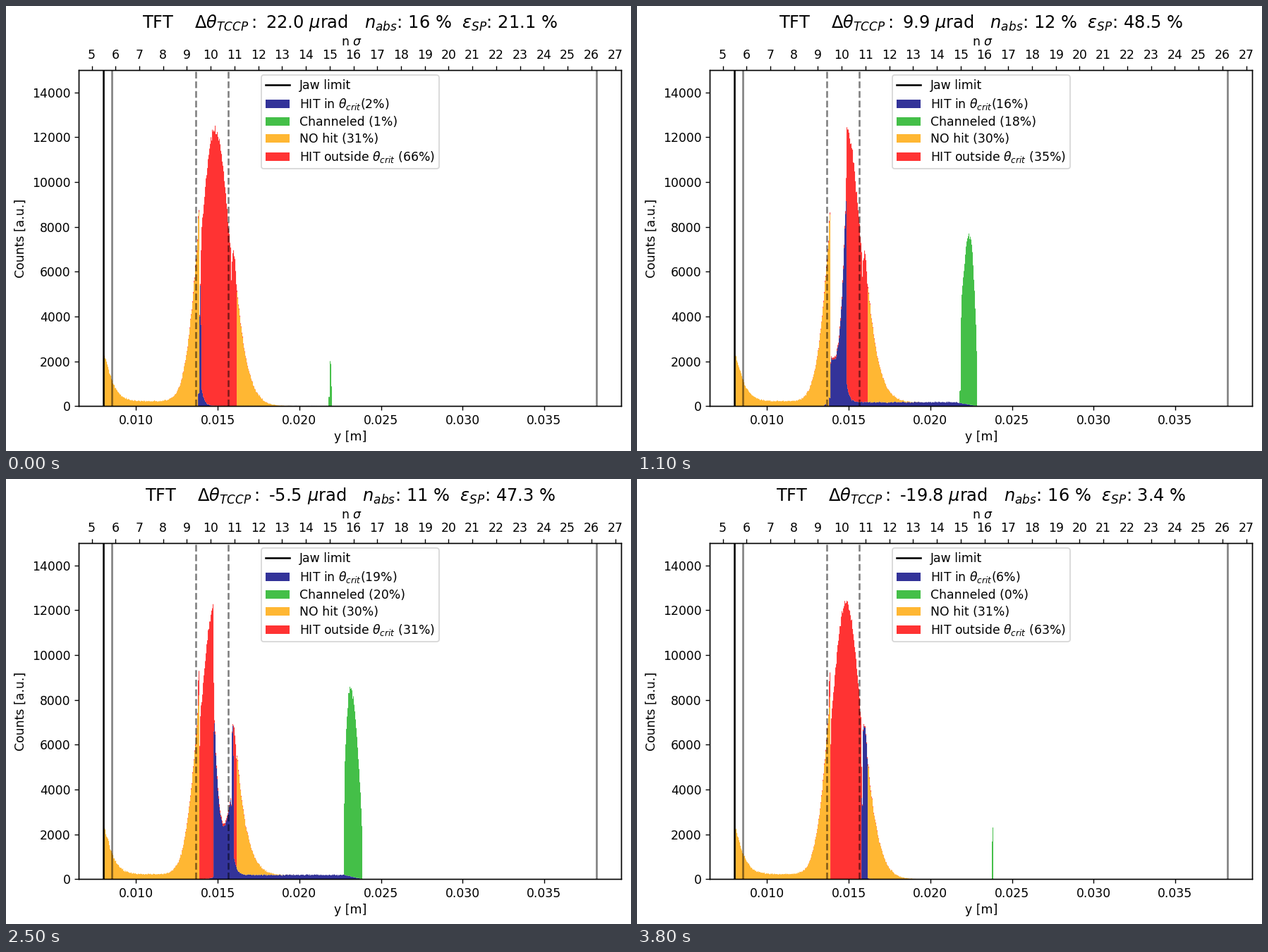
A matplotlib script that plays this animation: 886 px wide and 632 px high, repeating every 3900 ms.

```python
import numpy as np
import matplotlib.pyplot as plt
from matplotlib.animation import FuncAnimation
from matplotlib.lines import Line2D
from matplotlib.patches import Patch

W, H, DPI = 886, 632, 124
FRAMES, INTERVAL = 39, 100

plt.rcParams["font.family"] = "DejaVu Sans"

BLUE, GREEN, ORANGE, RED = "#333399", "#44bf48", "#ffb733", "#ff3333"

# Positions along y in mm
SIGMA_MM = 1.4572
HIT_START, CHANNEL_END, HIT_END = 13.855, 15.865, 16.146
SHIFT = 7.995        # deflection of channeled particles
HALF_BAND = 0.618    # acceptance half-width
BIN = 0.0432
BEST_ANGLE = 1.6     # urad

edges = 8.0 + BIN * np.arange(386)
mid = edges[:-1] + BIN / 2


def bell(x, height, center, width):
    return height * np.exp(-0.5 * ((x - center) / width) ** 2)


def tail(distance, height, slope, bend):
    """Falling flank; zero on the near side of its edge."""
    d = np.clip(distance, 0, None)
    return np.where(distance > 0, height * np.exp(-slope * d - bend * d**2), 0)


def hits(x):
    """Density of particles that meet the crystal."""
    core = bell(x, 12400, 14.849, 0.877)
    at_face = (x < HIT_START + 0.06) | (x > CHANNEL_END - 0.06)
    core = np.where(at_face, 0.87 * core, core)
    core = np.where(x > CHANNEL_END, bell(x, 6900, 15.97, 0.25), core)
    spike = np.where(x > HIT_START - 0.085, 1000, 0)
    return np.where(x < HIT_START, spike, np.where(x < HIT_END, core, 0))


def no_hits(x):
    halo = 220 + 2150 * np.exp(-((x - 8) / 0.61) ** 1.3)
    return (np.where(x < HIT_START, halo, 0)
            + tail(HIT_START - x, 7900, 1.2, 0.72)
            + tail(x - HIT_END, 5400, 1.4, 0.28))


def split(x, center):
    """Inside-band weight and the share of it that stays unchanneled."""
    u = (x - center) / HALF_BAND
    inside = np.clip((1 - abs(u)) * 15 + 0.5, 0, 1)
    stay = np.clip(0.23 + 0.08 * u + 0.42 * u**2 + 0.1 * u**4, 0, 1)
    return inside, np.where(x < CHANNEL_END, stay, 1)


def channeled_pct(theta):
    reach = max(0, 1 - ((theta - BEST_ANGLE) / 21) ** 2)
    return max(0, 24.1 * reach**1.7 + 0.018 * theta)


def percentages(theta):
    """Legend shares: hit in band, channeled, no hit, hit outside."""
    chan = channeled_pct(theta)
    inner = (0.9 * chan + 6.3 / (1 + np.exp((theta + 8) / 1.7))
             + 1.5 * np.exp((theta - 22) / 2))
    miss = 30.35 + 0.0018 * (theta - BEST_ANGLE) ** 2
    return inner, chan, miss, 100 - inner - chan - miss


def layers(theta, seed):
    """Counts per bin, from the bottom of the stack to the top."""
    center = 14.646 + 0.0726 * (4.4 - theta)
    low, high = center - HALF_BAND, center + HALF_BAND
    share = channeled_pct(theta)

    base, wings = hits(mid), no_hits(mid)
    inside, stay = split(mid, center)

    # Dechanneled particles trail from the band to the deflected peak
    start, end = min(high, HIT_END), min(high, CHANNEL_END) + SHIFT
    amp = 900 * np.exp(-max(high - HIT_END, 0) / 0.3)
    plateau = 9.5 * share * np.clip((end - mid) / (end - low - SHIFT), 0, 1)
    trail = np.where(mid > start, plateau, 0) + tail(mid - start, amp, 5.9, 0)
    trail += np.where(mid > 13.5, tail(low - mid, 5.5 * share, 5, 0), 0)

    origin = mid - SHIFT
    inside_o, stay_o = split(origin, center)

    blue = base * inside * stay + trail
    green = 0.96 * hits(origin) * inside_o * (1 - stay_o)
    red = np.clip(base * (1 - inside) - trail, 0, None)
    red += 0.01 * base * inside + 0.012 * np.where(mid > 12, wings, 0)

    rng = np.random.default_rng(seed)
    return [rng.poisson(part) for part in (blue, green, wings, red)]


def title_text(theta):
    absorbed = 10.8 + 0.0124 * (theta - BEST_ANGLE) ** 2
    eff = (48.6 - 27.5 * max(theta / 22, 0) ** 6.912
           - 14.8 * max(-theta / 13.2, 0) ** 2.7535)
    return (rf"TFT    $\Delta\theta_{{TCCP}}:$ {theta:.1f} $\mu$rad"
            rf"   $n_{{abs}}$: {absorbed:.0f} %"
            rf"  $\varepsilon_{{SP}}$: {eff:.1f} %")


def legend_texts(theta):
    inner, chan, miss, outer = percentages(theta)
    return ["Jaw limit",
            rf"HIT in $\theta_{{crit}}$({inner:.0f}%)",
            f"Channeled ({chan:.0f}%)",
            f"NO hit ({miss:.0f}%)",
            rf"HIT outside $\theta_{{crit}}$ ({outer:.0f}%)"]


fig = plt.figure(figsize=((W + 0.01) / DPI, (H + 0.01) / DPI), dpi=DPI,
                 facecolor="white")
ax = fig.add_axes([103.4 / W, (H - 568.2) / H, 768.8 / W, 477.4 / H])
ax.set_xlim(0.0065, 0.03972)
ax.set_ylim(0, 15000)
ticks = 0.005 * np.arange(2, 8)
ax.set_xticks(ticks, [f"{t:.3f}" for t in ticks])
ax.set_yticks(range(0, 14001, 2000))
ax.set_xlabel("y [m]", labelpad=3)
ax.set_ylabel("Counts [a.u.]")

top = ax.twiny()
top.set_xlim(np.array(ax.get_xlim()) * 1000 / SIGMA_MM)
top.set_xticks(range(5, 28))
top.set_xlabel(r" n $\sigma$", labelpad=3)

colors = [BLUE, GREEN, ORANGE, RED]
zeros = np.zeros(len(mid))
steps = [ax.stairs(zeros, edges / 1000, baseline=zeros, fill=True,
                   facecolor=c, edgecolor="none", lw=0) for c in colors]

ax.axvline(0.008, color="black", lw=1.5)
for pos, style in ((0.0085, "-"), (0.0382, "-"),
                   (0.013656, "--"), (0.015649, "--")):
    ax.axvline(pos, color="black", alpha=0.5, lw=1.5, ls=style)

handles = [Line2D([], [], color="black", lw=1.5)]
handles += [Patch(facecolor=c, edgecolor="none", lw=0) for c in colors]
legend = ax.legend(handles, legend_texts(22.0), loc="upper center",
                   labelspacing=0.36, borderpad=0.35, borderaxespad=0.44)
title = fig.text(487.8 / W, (H - 31) / H, "", fontsize=14,
                 ha="center", va="baseline")


def update(i):
    theta = (220 - 11 * i) / 10
    floor = zeros
    for step, counts in zip(steps, layers(theta, 100 + i)):
        step.set_data(floor + counts, edges / 1000, floor)
        floor = floor + counts
    title.set_text(title_text(theta))
    for label, text in zip(legend.get_texts(), legend_texts(theta)):
        label.set_text(text)
    return [*steps, title, legend]


anim = FuncAnimation(fig, update, frames=FRAMES, interval=INTERVAL,
                     init_func=lambda: update(0), repeat=True,
                     repeat_delay=0, blit=False)
plt.show()
```
